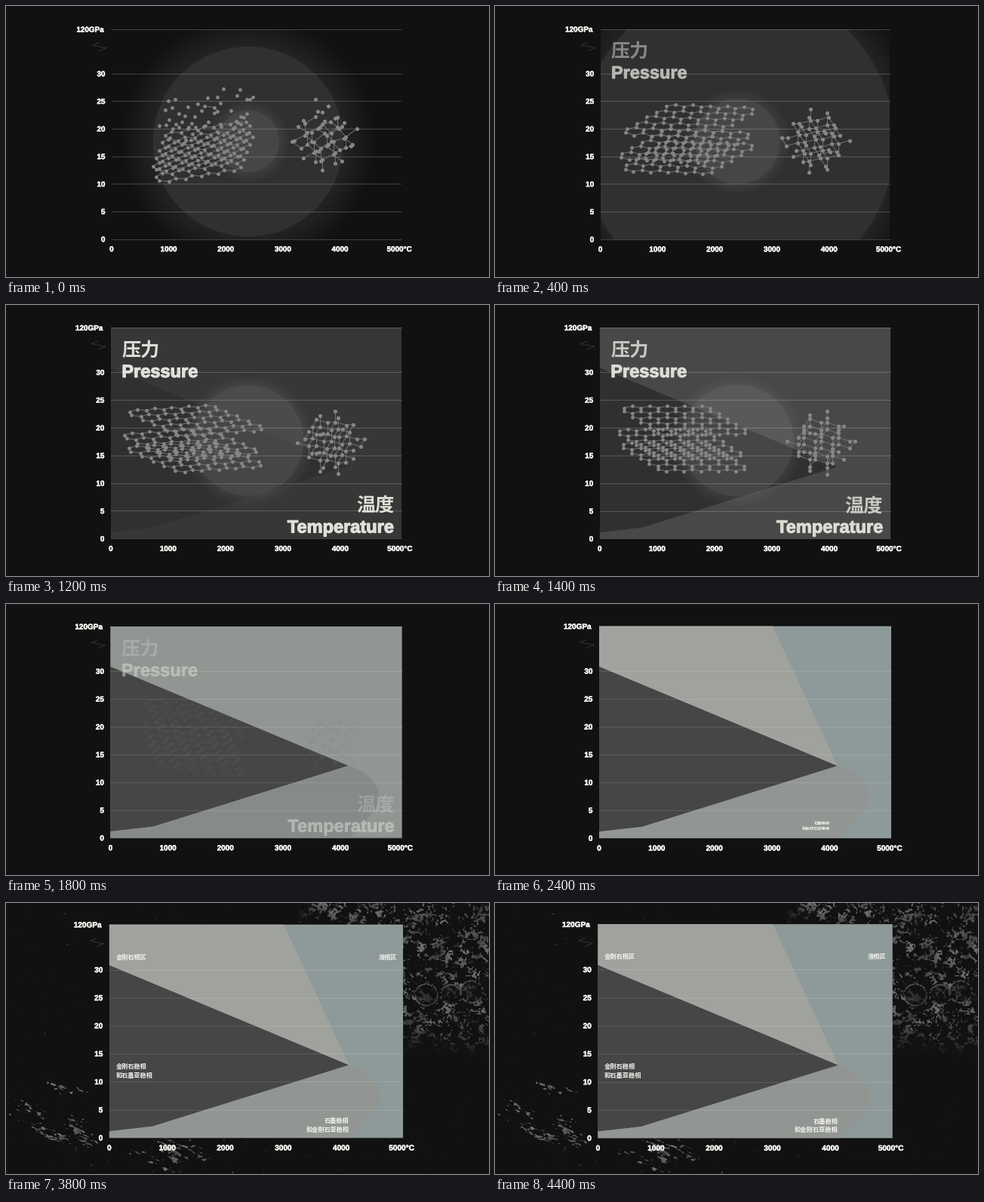
Recreate the animation shown at these times as a matplotlib script. Size 640 by 360 pixels, loop 4600 ms.

```python
import numpy as np
import matplotlib.pyplot as plt
from matplotlib.animation import FuncAnimation
from matplotlib.collections import LineCollection
from matplotlib.colors import to_rgb
from matplotlib.patches import PathPatch
from matplotlib.path import Path
from matplotlib.patheffects import withStroke

W, H = 640, 360
STEP, FRAMES = 200, 23
PT = 0.72                       # points per pixel at 100 dpi
BG = 17
CENTER = np.array([331.5, 170.5])
LEFT, RIGHT, TOP, BOTTOM = 138, 525, 29.5, 311
LATIN, CJK = "Liberation Sans", "Noto Sans CJK JP"
APEX = (454, 215)

yy, xx = np.mgrid[0:H, 0:W] + 0.5
rng = np.random.default_rng(7)


# ---------- rock textures ----------
def noise(x, y):
    """Smooth value noise on a random lattice."""
    grid = rng.random((256, 256))
    ix, iy = np.floor(x).astype(int), np.floor(y).astype(int)
    fx, fy = x - ix, y - iy

    def at(dx, dy):
        return grid[(iy + dy) % 256, (ix + dx) % 256]

    upper = at(0, 0) * (1 - fx) + at(1, 0) * fx
    lower = at(0, 1) * (1 - fx) + at(1, 1) * fx
    return upper * (1 - fy) + lower * fy


def turn(x, y, deg):
    c, s = np.cos(np.radians(deg)), np.sin(np.radians(deg))
    return x * c + y * s, y * c - x * s


def blob(x, y, length, width, deg):
    u, v = turn(xx - x, yy - y, deg)
    return np.exp(-(u / length) ** 2 - (v / width) ** 2)


def streaky_rock():
    u, v = turn(xx, yy, 24)
    fine = 0.6 * noise(u / 7, v / 1.8) + 0.4 * noise(u / 2.5, v / 1.5)
    env = np.maximum.reduce([
        0.75 * blob(72, 243, 36, 7, 18),
        0.55 * blob(30, 275, 34, 9, 28),
        0.70 * blob(62, 308, 52, 10, 22),
        1.00 * blob(98, 304, 25, 10, 52),
        1.00 * blob(222, 333, 26, 12, 50),
        0.70 * blob(190, 340, 36, 10, 25),
        0.50 * blob(250, 332, 28, 10, 25),
    ])
    return np.clip((fine + 0.55 * env - 0.86) * 9, 0, 1) * (45 + 60 * noise(xx / 6, yy / 6))


def crystal_rock():
    edge = np.abs(noise(xx / 7, yy / 7) - 0.5) < 0.07
    grain = 0.5 * noise(xx / 2.2, yy / 2.2) + 0.5 * noise(xx / 9, yy / 8)
    env = np.clip((xx - 385) / 30, 0, 1) * np.clip((203 - yy) / 40, 0, 1)
    val = np.clip((grain + 0.12 * edge - 0.58) * 8, 0, 1) * env
    for x, y, r in ((557, 122, 15), (590, 122, 14), (617, 118, 15)):
        d = np.hypot(xx - x, (yy - y) * 1.05)
        val[d < r] *= 0.45
        ring = np.clip(1 - np.abs(d - r) / 1.8, 0, 1) * (grain > 0.35)
        val = np.maximum(val, 0.9 * ring)
    return val * (35 + 65 * noise(xx / 12, yy / 12))


ROCK_L, ROCK_R = streaky_rock(), crystal_rock()


# ---------- lattices ----------
def graphite(n=6, a=22.9):
    """Three honeycomb rhombi, without the single atoms at the sharp tips."""
    a1 = a * np.array([np.cos(np.pi / 6), -0.5])
    a2 = a * np.array([np.cos(np.pi / 6), 0.5])
    mid = (n - 1 + 1 / 3) / 2 * (a1 + a2)
    pts = []
    for height, shift in ((-29, 2), (5, -5), (23, 1)):
        for i in range(n):
            for j in range(n):
                for q in (0, 1 / 3):
                    if i + j + 2 * q in (0, 2 * (n - 1) + 2 / 3):
                        continue
                    x, z = (i + q) * a1 + (j + q) * a2 - mid
                    pts.append((x + shift, height, z))
    return np.array(pts)


def diamond(bond=16):
    a = bond * 1.633
    a1, a2 = np.array([-a, 0]), np.array([-a / 2, -a * np.sqrt(3) / 2])
    pts = []
    for m in range(-3, 4):
        for i in range(-6, 7):
            for j in range(-6, 7):
                for q in (0, 1):
                    x, z = i * a1 + j * a2 + (m + q) * (a1 + a2) / 3
                    y = (4 * m + q) * bond / 3 - bond / 6
                    if np.hypot(x, z) / 54 + abs(y) / 64 < 1 and abs(y) < 43:
                        pts.append((x, y, z))
    return np.array(pts)


class Lattice:
    def __init__(self, pts, bond, dot):
        self.pts, self.dot = pts, dot
        dist = np.linalg.norm(pts[:, None] - pts[None], axis=2)
        self.a, self.b = np.nonzero(np.triu((dist > 1) & (dist < bond * 1.1)))
        height = (pts[:, 1].max() - pts[:, 1]) / np.ptp(pts[:, 1])
        self.delay = height + rng.uniform(-0.25, 0.25, len(pts))

    def draw(self, t, cx, cy, fade):
        ang = np.radians(np.interp(t, [0, 800, 2000], [-50, 0, 60]))
        tilt = np.interp(t, [0, 800], [0.45, 0.36])
        x, y, z = self.pts.T
        px = cx + x * np.cos(ang) - z * np.sin(ang)
        depth = x * np.sin(ang) + z * np.cos(ang)
        p = np.clip((t + 700 - 650 * self.delay) / 450, 0, 1)
        py = cy + y * np.sqrt(1 - tilt ** 2) + depth * tilt - 14 * (1 - p) ** 2
        pos = np.column_stack([px, py])
        joined = (p[self.a] > 0.4) & (p[self.b] > 0.4)
        segs = np.stack([pos[self.a], pos[self.b]], axis=1)[joined]
        ax.add_collection(LineCollection(segs, colors="#707070", lw=PT, alpha=fade, zorder=4))
        ax.scatter(*pos[p > 0].T, s=self.dot, c="#868686", lw=0, alpha=fade, zorder=5)


SHEETS = Lattice(graphite(), 13.2, 12)
GEM = Lattice(diamond(), 16, 14)

# ---------- chart ----------
OUTSIDE = [(LEFT, TOP), (RIGHT, TOP), (RIGHT, BOTTOM), (LEFT, BOTTOM),
           (LEFT, 302.5), (195, 296), APEX, (LEFT, 83)]
DIAMOND_AREA = [(LEFT, TOP), (368, TOP), APEX, (LEFT, 83)]
GRAPHITE_AREA = [(LEFT, BOTTOM), (LEFT, 302.5), (195, 296), APEX,
                 (480, 222), (495, 240), (495, 257),
                 (495, 277), (470, 290), (457, BOTTOM)]
GRAPHITE_CODES = [Path.MOVETO] + [Path.LINETO] * 3 + [Path.CURVE4] * 6
GRID_Y = [TOP] + [BOTTOM - 37 * i for i in range(7)]

# lines of text, x, alignment, y of each line, start time
LABELS = [
    (("石墨稳相", "和金刚石亚稳相"), 453.6, "right", (288.6, 299.8), 2200),
    (("金刚石稳相", "和石墨亚稳相"), 146.6, "left", (216.8, 228.8), 2400),
    (("金刚石相区",), 146.6, "left", (72.3,), 2600),
    (("液相区",), 517.4, "right", (72.3,), 2800),
]


def mix(c1, c2, p):
    return tuple(np.array(to_rgb(c1)) * (1 - p) + np.array(to_rgb(c2)) * p)


def ramp(t, start, end):
    return float(np.clip((t - start) / (end - start), 0, 1))


def glow(r, core, tail):
    """Flat disc with a step at its rim, then a fading halo."""
    halo = 0.6 * np.clip(1 - (r - core) / tail, 0, 1)
    return np.where(r < core, 1, halo)


fig = plt.figure(figsize=(W / 100, H / 100), dpi=100, facecolor="#111111")
ax = fig.add_axes([0, 0, 1, 1])


def draw(frame):
    t = frame * STEP
    k = 1 + 0.018 * (t - 2400) / 4400
    ax.clear()
    ax.axis("off")

    def place(pts):
        return CENTER + (np.asarray(pts, float) - CENTER) * k

    def area(pts, color, alpha, codes=None):
        if alpha > 0:
            path = Path(place(pts), codes)
            ax.add_patch(PathPatch(path, fc=color, lw=0, alpha=alpha, zorder=2))

    def write(s, x, y, size, ha="left", font=LATIN, color="#f2f2ee", alpha=1):
        if alpha > 0 and size > 0.5:
            px, py = place((x, y))
            text = ax.text(px, py + 0.36 * size, s, fontsize=size * k * PT, ha=ha, va="baseline",
                           family=font, weight="bold", color=color, alpha=alpha, zorder=6)
            if font == LATIN:
                text.set_path_effects([withStroke(linewidth=0.05 * size * PT, foreground=color)])

    # soft expanding discs inside the chart, rocks behind it
    r = np.hypot(xx - 321, yy - 180)
    outer = np.interp(t, [0, 800], [126, 290])
    inner = np.interp(t, [0, 800, 1400, 1800, 2000], [41, 72, 74, 230, 330])
    disc = BG + 31 * glow(r, outer, 44) + 22 * glow(r, inner, 15)
    (x0, y0), (x1, y1) = place([(LEFT, TOP), (RIGHT, BOTTOM)])
    inside = (xx > x0) & (xx < x1) & (yy > y0) & (yy < y1)
    rocks = ROCK_L * ramp(t, 2800, 3200) + ROCK_R * ramp(t, 3200, 3800)
    ax.imshow(np.where(inside, disc, BG + rocks), cmap="gray", vmin=0, vmax=255,
              extent=(0, W, H, 0), aspect="auto", interpolation="nearest", zorder=0)

    # phase areas
    settle = ramp(t, 1800, 2400)
    cover = np.interp(t, [1000, 1200, 1400, 1600, 1800], [0, 0.07, 0.24, 0.6, 1])
    area(OUTSIDE, mix("#929693", "#8e9999", settle), cover)
    area(DIAMOND_AREA, "#a0a29e", settle)
    area(GRAPHITE_AREA, mix("#868a88", "#929693", settle), ramp(t, 1600, 1800), GRAPHITE_CODES)

    # grid and axes
    shade = np.interp(t, [1400, 1800], [0.2, 0.12])
    for y in GRID_Y:
        (left, level), (right, _) = place([(LEFT, y), (RIGHT, y)])
        ax.plot([left, right], [level, level], color="white", lw=PT, alpha=shade, zorder=3)
    ax.plot(*place([(121, 47.5), (112.5, 51), (131, 54.5), (121, 58.5)]).T,
            color="#484848", lw=0.6 * PT, zorder=3)
    write("120GPa", 127.5, TOP, 10, "right")
    for i, y in enumerate(GRID_Y[1:]):
        write(str(5 * i), 129.5, y, 10, "right")
    for i in range(5):
        write(str(1000 * i), LEFT + 76.4 * i, 324, 10, "center")
    write("5000°C", 523, 324, 10, "center")

    # crystals
    fade = float(np.interp(t, [1400, 1600, 1800, 2000], [1, 0.55, 0.08, 0]))
    if fade > 0:
        SHEETS.draw(t, np.interp(t, [0, 800], [262, 249]), 180, fade)
        GEM.draw(t, np.interp(t, [0, 1400], [422, 432]), np.interp(t, [0, 800], [176, 183]), fade)

    # titles
    out = np.interp(t, [1200, 1400, 1800, 2000], [1, 0.85, 0.28, 0])
    for cn, en, x, ha, y, start in (("压力", "Pressure", 152.5, "left", 58, 200),
                                    ("温度", "Temperature", 515, "right", 265.5, 800)):
        a = ramp(t, start, start + 400) * out
        write(cn, x, y, 25.3, ha, CJK, "#dfe0d9", a)
        write(en, x, y + 29, 23.7, ha, LATIN, "#dfe0d9", a)

    # labels grow from their own centre
    for lines, x, ha, ys, start in LABELS:
        s = 1 - (1 - ramp(t, start, start + 400)) ** 1.5
        half = 4.1 * max(map(len, lines))
        cx = x - half if ha == "right" else x + half
        cy = sum(ys) / len(ys)
        for line, y in zip(lines, ys):
            write(line, cx + (x - cx) * s, cy + (y - cy) * s, 8.15 * s, ha, CJK)

    ax.set_xlim(0, W)
    ax.set_ylim(H, 0)
    return []


anim = FuncAnimation(fig, draw, frames=FRAMES, interval=STEP, init_func=lambda: [],
                     repeat=True, repeat_delay=0, blit=False)
plt.show()
```
